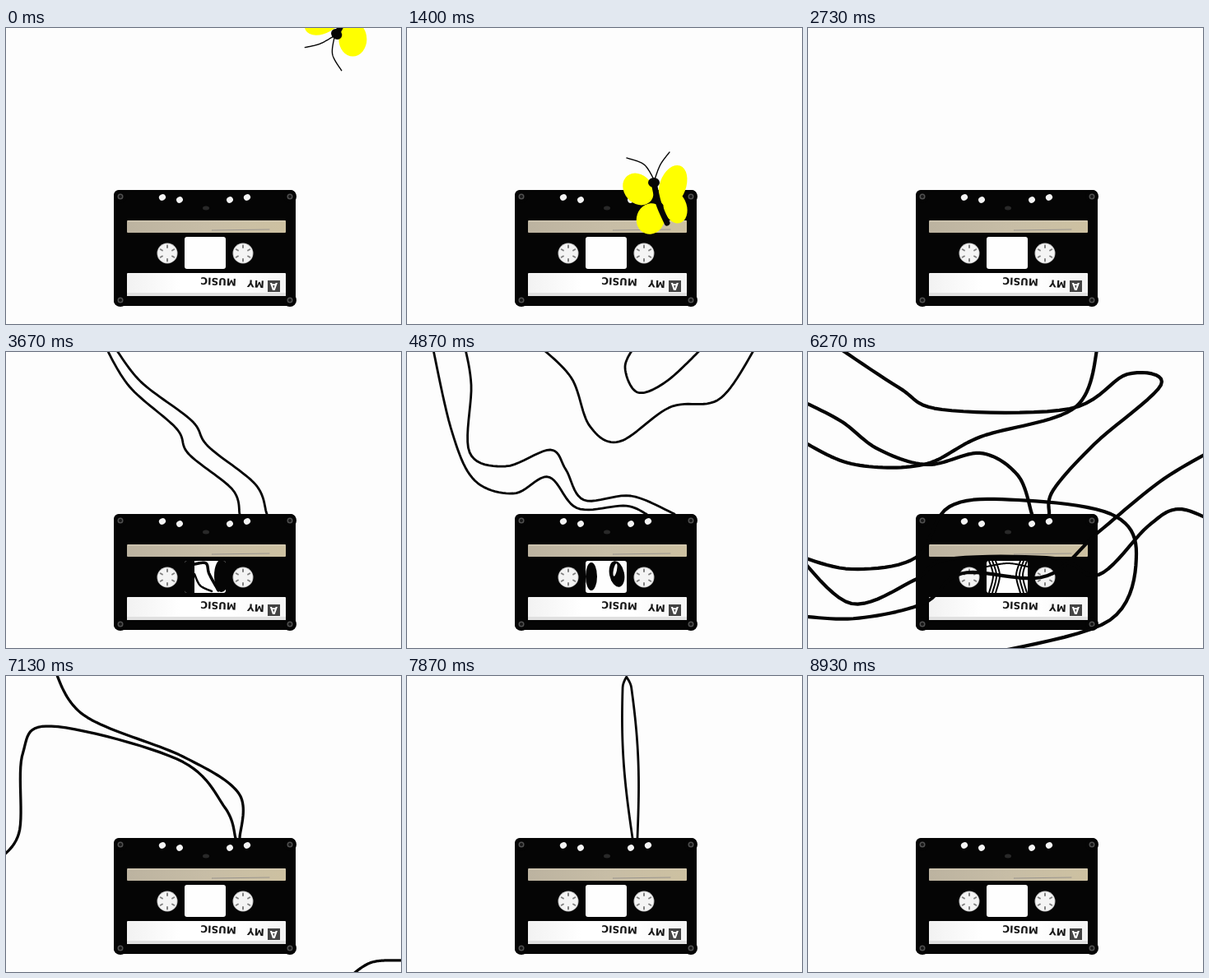
Animation, 480 px wide and 360 px high, one loop 9870 ms. Source, as an HTML page with a canvas:

```html
<!DOCTYPE html>
<html lang="en">
<head>
<meta charset="utf-8">
<title>Cassette</title>
<style>
html, body { margin: 0; width: 100%; height: 100%; overflow: hidden; background: #fdfdfd; }
canvas { display: block; width: 480px; height: 360px; }
</style>
</head>
<body>
<canvas id="stage" width="480" height="360"></canvas>
<script>
const ctx = document.getElementById('stage').getContext('2d');
const LOOP = 9870, FPS = 15, LAST = 134, SAMPLES = 80;
const INK = '#050505', YELLOW = '#ff0';

const clamp = v => Math.max(0, Math.min(1, v));
const mix = (a, b, p) => a + (b - a) * p;
const ramp = (s, from, to) => clamp((s - from) / (to - from));
const arch = p => Math.sin(Math.PI * p);
const sample = fn => Array.from({ length: SAMPLES + 1 }, (_, i) => fn(i / SAMPLES));

// Turns "x,y x,y ..." into evenly indexed samples of a smooth curve.
function curve(text) {
  const pts = text.split(' ').map(p => p.split(',').map(Number));
  const end = pts.length - 1;
  const at = i => pts[Math.max(0, Math.min(end, i))];
  return sample(t => {
    const u = t * end, i = Math.min(end - 1, Math.floor(u)), f = u - i;
    return [0, 1].map(k => {
      const [a, b, c, d] = [-1, 0, 1, 2].map(j => at(i + j)[k]);
      return b + f / 2 * (c - a + f * (2 * a - 5 * b + 4 * c - d + f * (3 * (b - c) + d - a)));
    });
  });
}

function morph(poses, s) {
  let i = 0;
  while (i < poses.length - 2 && s >= poses[i + 1][0]) i++;
  const [[from, a], [to, b]] = [poses[i], poses[i + 1]];
  const p = ramp(s, from, to);
  return a.map(([x, y], n) => [mix(x, b[n][0], p), mix(y, b[n][1], p)]);
}

// The two strands that leave the shell: pulled out, waving, tangled, reeled in
const pulled = curve('118,-12 150,42 207,93 222,124 275,167 284,197');
const upright = side => sample(u => [mix(266, 277, u) + side * (3 + 6 * arch(u)), mix(-12, 197, u)]);

const left = [
  [3.667, pulled],
  [4.867, curve('30,-12 54,95 82,156 130,172 172,152 207,190 265,187 291,197')],
  [6.267, curve('-15,56 40,84 85,118 145,137 210,123 255,150 272,197')],
  [7.133, curve('-12,226 16,190 20,95 55,61 210,102 266,160 279,197')],
  [7.4, curve('-12,-12 140,60 250,135 277,197')],
  [7.8, upright(-1)]
];
const right = [
  [3.667, pulled.map(([x, y], i) => [x + mix(9, 33, i / SAMPLES), y - 10 * arch(i / SAMPLES)])],
  [4.867, curve('69,-12 78,40 76,122 120,139 174,119 193,143 215,180 272,175 325,197')],
  [6.267, curve('30,-10 110,43 163,70 318,69 388,27 429,40 348,112 298,168 293,197')],
  [7.133, curve('57,-12 95,48 215,98 283,143 284,197')],
  [7.8, upright(1)]
];

// Loops that slide in over an edge and out again
const hanging = [
  { from: 4, full: 4.867, gone: 5.6, dy: -130, pts: curve('160,-8 200,32 222,90 258,109 320,67 380,57 425,-8') },
  { from: 4.1, full: 4.867, gone: 5.5, dy: -70, pts: curve('280,-12 265,18 280,49 315,36 362,-8') },
  { from: 6.9, full: 7.133, gone: 7.35, dy: 25, pts: curve('415,368 445,348 490,346') }
];

// Tape that grows across the stage and around the shell
const winding = [
  '353,-12 325,67 210,103 140,137 53,136 -15,104',
  '500,115 430,156 353,219 288,273 188,269 140,306 58,324 -12,321',
  '-12,248 53,264 131,250 172,188 255,180 368,197 399,245 367,326 225,366',
  '495,207 450,191 413,212 353,271 300,251 170,252 130,277 53,306 -12,248'
].map(curve);

function stroke(pts, width, color = INK) {
  ctx.beginPath();
  pts.forEach(([x, y]) => ctx.lineTo(x, y));
  ctx.lineWidth = width;
  ctx.strokeStyle = color;
  ctx.stroke();
}

function oval(x, y, rx, ry, color, turn = 0) {
  ctx.beginPath();
  ctx.ellipse(x, y, rx, ry, turn, 0, 7);
  ctx.fillStyle = color;
  ctx.fill();
}

function box(x, y, w, h, color, r = 0) {
  ctx.beginPath();
  ctx.roundRect(x, y, w, h, r);
  ctx.fillStyle = color;
  ctx.fill();
}

function shade(...colors) {
  const g = ctx.createLinearGradient(147, 0, 340, 0);
  colors.forEach((c, i) => g.addColorStop(i / (colors.length - 1), c));
  return g;
}

function flipped(text, x, y, color, tilt = 0) {
  ctx.save();
  ctx.translate(x, y);
  ctx.rotate(Math.PI + tilt);
  ctx.font = 'bold 12px "DejaVu Sans", sans-serif';
  ctx.fillStyle = color;
  ctx.fillText(text, 0, 0);
  ctx.restore();
}

function reel(x, y) {
  oval(x, y, 12.5, 12.5, '#c8c8c8');
  oval(x, y, 11.5, 11.5, '#f4f4f4');
  for (let i = 0; i < 6; i++) {
    const a = (i + .5) * Math.PI / 3, c = Math.cos(a), d = Math.sin(a);
    stroke([[x + 7 * c, y + 7 * d], [x + 9.5 * c, y + 9.5 * d]], 2, '#808080');
  }
}

function tapeWindow(s) {
  box(217, 254, 50, 39, '#fefefe', 3);
  if (s < 2.87 || s > 7) return;
  ctx.save();
  ctx.clip();
  if (s < 4.2) {
    box(217, 254, 12, 39, INK);
    oval(262, 272, 9, 20, INK);
    stroke(curve('229,258 243,257 247,270 258,290'), 3.5);
    stroke(curve('229,270 236,284 250,291'), 2.5);
  } else if (s < 5.2) {
    oval(224, 273, 7, 17, INK);
    oval(255, 270, 9, 16, INK, -.2);
    oval(253, 265, 2, 8, '#fff', .2);
  } else {
    for (const side of [-1, 1]) for (let i = 0; i < 3; i++) {
      const x = 243 + side * (23 - 4 * i);
      stroke(curve(`${x},254 ${x - side * 5},272 ${x},293`), 2);
    }
    stroke(curve('217,261 243,257 267,261'), 2);
  }
  ctx.restore();
}

function cassette(s) {
  box(131, 197, 221, 141, INK, 6);
  for (const x of [139, 345]) for (const y of [205, 331]) {
    oval(x, y, 8, 8, INK);
    oval(x, y, 3.5, 3.5, '#505050');
    oval(x, y, 2, 2, '#171717');
  }
  for (const side of [-1, 1]) {
    oval(241.5 + side * 51.5, 206, 4.2, 3.6, '#f4f4f4', -.5);
    oval(241.5 + side * 30.5, 209, 4, 3.6, '#f4f4f4', -.5);
    reel(242 + side * 46, 274);
  }
  oval(243, 219, 4, 2.5, '#292929');

  box(147, 234, 193, 15, shade('#bcb3a0', '#c7bda6', '#cdc1a1'), 1);
  stroke([[148, 235], [339, 235]], 1, '#d8cfba');
  stroke([[250, 246], [320, 245]], 1, '#9a958f');
  tapeWindow(s);

  box(147, 298, 193, 28, shade('#f2f2f2', '#fff', '#fff', '#f4f4f4'), 1);
  box(147, 322, 193, 4, '#e0e0e0');
  box(318, 307, 15, 14, '#444');
  flipped('A', 330, 309.5, '#fff');
  flipped('MY', 314, 307.5, '#181818', .06);
  flipped('MUSIC', 280, 305, '#181818', .04);
}

// Flies in, lands, lifts off and vanishes into a hole of the shell
function butterfly(s, frame) {
  if (s >= 2.73) return;
  const land = ramp(s, 0, 1.4), leave = ramp(s, 1.6, 2.73), lean = -.316;
  const flap = .78 + .22 * Math.cos(frame * Math.PI * 2 / 7);
  const size = 1 - leave ** 3;
  ctx.save();
  ctx.translate(
    mix(mix(411, 308, land), 273, leave) + 35 * arch(land) + 45 * arch(leave),
    mix(mix(-16, 212, land), 209, leave) - 38 * arch(leave)
  );
  ctx.rotate((-140 * (1 - land ** 2) + 20 * arch(leave)) * Math.PI / 180);
  ctx.scale(size, size);
  ctx.save();
  ctx.rotate(lean);
  ctx.scale(flap, 1);
  ctx.rotate(-lean);
  oval(-27, -16, 17, 21, YELLOW, -.7);
  oval(15, -20, 16, 26, YELLOW, .35);
  oval(-12, 20, 17, 19, YELLOW, .35);
  oval(18, 6, 14, 20, YELLOW, -.3);
  ctx.restore();
  stroke(curve('-8,-24 -2,2 8,25'), 7);
  oval(-8, -24, 7, 6, INK);
  stroke(curve('-8,-28 -20,-46 -41,-54'), 1.4);
  stroke(curve('-7,-28 0,-46 11,-61'), 1.4);
  ctx.restore();
}

// Joins two strands into one loop with a rounded tip.
function loop(a, b) {
  const pinch = (p, q) => p.map(([x, y], i) => {
    const k = .5 * clamp(1 - i / 5) ** 2;
    return [mix(x, q[i][0], k), mix(y, q[i][1], k)];
  });
  return [...pinch(a, b).reverse(), ...pinch(b, a)];
}

function tape(s) {
  if (s < 2.87 || s > 8.75) return;
  const width = 2.8 + 1.4 * arch(ramp(s, 5, 7.4));

  for (const { from, full, gone, dy, pts } of hanging) {
    if (s <= from || s >= gone) continue;
    const away = 1 - ramp(s, from, full) + ramp(s, full, gone);
    stroke(pts.map(([x, y]) => [x, y + dy * away]), width);
  }
  winding.forEach((pts, i) => {
    const shown = ramp(s, 5 + i * .1, 6.2) * (1 - ramp(s, 6.45, 7.1));
    if (shown > 0) stroke(pts.slice(0, Math.ceil(shown * SAMPLES) + 1), width);
  });

  const out = s < 5 ? ramp(s, 2.8, 3.667) : 1 - ramp(s, 7.8, 8.75);
  const skip = Math.floor((1 - out) * SAMPLES);
  const a = morph(left, s).slice(skip), b = morph(right, s).slice(skip);
  (out < 1 ? [loop(a, b)] : [a, b]).forEach(pts => stroke(pts, width));
}

function draw(ms) {
  const frame = Math.min(LAST, Math.floor(ms % LOOP * FPS / 1000 + .1));
  const s = frame / FPS;
  ctx.fillStyle = '#fdfdfd';
  ctx.fillRect(0, 0, 480, 360);
  ctx.lineCap = ctx.lineJoin = 'round';
  cassette(s);
  tape(s);
  butterfly(s, frame);
}

let start;
function tick(now) {
  start ??= now;
  draw(now - start);
  requestAnimationFrame(tick);
}
draw(0);
requestAnimationFrame(tick);
</script>
</body>
</html>
```
